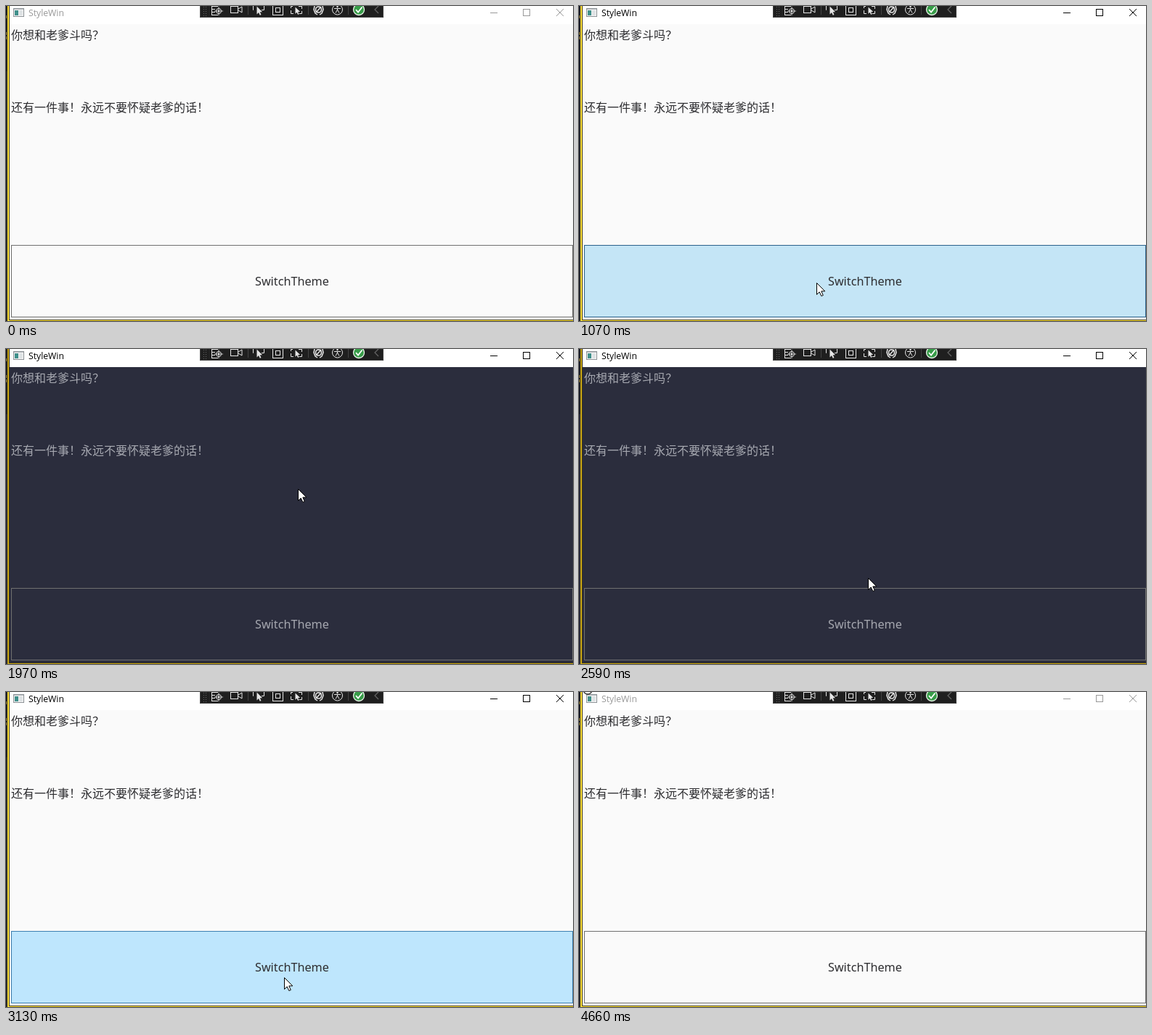
Animation, 781 px wide and 435 px high, one loop 4750 ms. Source, as an HTML page with a canvas:

```html
<!DOCTYPE html>
<html lang="zh">
<head>
<meta charset="utf-8">
<title>StyleWin</title>
<style>
  html, body { margin: 0; width: 100%; height: 100%; overflow: hidden; background: #fff; }
  canvas { display: block; width: 781px; height: 435px; }
</style>
</head>
<body>
<canvas id="stage" width="781" height="435"></canvas>
<script>
const ctx = document.getElementById('stage').getContext('2d');
const LOOP = 4750;
const CJK = '16px "Noto Sans CJK SC", "Noto Sans CJK JP", "Noto Sans CJK", sans-serif';

const THEMES = {
  light: { bg: '#fafafa', text: '#2d2d30', glow: '#ffe23c', edge: '#4b4318', strip: '#292926' },
  dark: { bg: '#2b2d3d', text: '#a6a8b0', glow: '#caa714', edge: '#35311f', strip: '#2a2a31' }
};
const BUTTON = {
  idle: { fill: null, line: '#707070' },
  hover: { fill: '#bee6fd', line: '#3c7fb1' },
  pressed: { fill: '#c4e5f6', line: '#2c628b' }
};

// Pointer samples: time, x, y
const POINTER = [
  [90, 62, 42], [180, 158, 152], [270, 245, 272], [360, 306, 356], [450, 327, 382],
  [1700, 327, 366], [1880, 356, 306], [1970, 402, 193], [2060, 409, 177],
  [2150, 412, 171], [2240, 413, 170], [2410, 412, 184], [2500, 407, 238],
  [2590, 398, 316], [2680, 387, 375], [2770, 383, 394],
  [3930, 379, 391], [4040, 308, 316], [4130, 178, 188], [4220, 70, 70], [4310, 3, 2]
];
const BUSY_FROM = 4570;

function box(x, y, w, h, color) {
  ctx.fillStyle = color;
  ctx.fillRect(x, y, w, h);
}

function frame(x, y, w, h, color) {
  ctx.strokeStyle = color;
  ctx.lineWidth = 1;
  ctx.strokeRect(x + .5, y + .5, w - 1, h - 1);
}

function path(points, color, width = 1) {
  ctx.beginPath();
  for (let i = 0; i < points.length; i += 2) ctx.lineTo(points[i], points[i + 1]);
  ctx.strokeStyle = color;
  ctx.lineWidth = width;
  ctx.stroke();
}

function circle(x, y, r, line, fill, width = 1) {
  ctx.beginPath();
  ctx.arc(x, y, r, 0, Math.PI * 2);
  if (fill) { ctx.fillStyle = fill; ctx.fill(); }
  if (line) { ctx.strokeStyle = line; ctx.lineWidth = width; ctx.stroke(); }
}

function label(str, x, y, font, color) {
  ctx.font = font;
  ctx.fillStyle = color;
  ctx.fillText(str, x, y);
}

function arrow(x, y, scale, fill, line) {
  ctx.save();
  ctx.translate(x + .5, y + .5);
  ctx.scale(scale, scale);
  ctx.beginPath();
  [[0, 0], [0, 16], [3.7, 12.4], [6.3, 18], [8.8, 17], [6.3, 11.4], [11.3, 11.4]]
    .forEach(p => ctx.lineTo(...p));
  ctx.closePath();
  ctx.fillStyle = fill;
  ctx.fill();
  if (line) { ctx.strokeStyle = line; ctx.lineWidth = 1; ctx.stroke(); }
  ctx.restore();
}

function titleBar(active) {
  const color = active ? '#000' : '#999';
  box(5, 0, 776, 25, '#fff');
  box(10, 3, 15, 12, '#f4f4f4');
  frame(10, 3, 15, 12, '#8c9296');
  box(11, 4, 13, 1, '#b9bec2');
  box(12, 6, 5, 7, '#3f8f8a');
  box(18, 6, 5, 7, '#dfe3e5');
  label('StyleWin', 31, 14, '12.2px "Open Sans", sans-serif', color);
  box(667, 9, 10, 1, color);
  frame(712, 4, 10, 10, color);
  path([758, 4, 768, 14], color);
  path([768, 4, 758, 14], color);
}

function toolbar() {
  const ink = '#e6e6e6';
  box(267, 0, 253, 16, '#1f1f1f');
  path([267.5, 0, 267.5, 15.5, 519.5, 15.5, 519.5, 0], '#444');
  for (let y = 1; y < 14; y += 3)
    for (let x = 272; x < 277; x += 3) box(x, y, 1, 1, '#666');
  [333, 416, 471].forEach(x => box(x, 0, 1, 12, '#444'));

  // element list with target
  [0, 4, 8, 12].forEach((y, i) => box(283, y, i % 3 ? 5 : 9, 1, ink));
  box(283, 0, 1, 12, ink);
  circle(293, 7, 3.5, ink);
  circle(293, 7, 1.2, null, ink);
  path([293, 1, 293, 13], ink, .8);
  path([287, 7, 299, 7], ink, .8);

  // camera
  frame(309, 0, 11, 10, ink);
  path([320, 4, 325, 1, 325, 9, 320, 6], ink);

  // select element
  path([341, 5.5, 340.5, 5.5, 340.5, 0], ink);
  path([355.5, 0, 355.5, 5.5, 352, 5.5], ink);
  arrow(345, 0, .68, ink);

  // nested boxes
  frame(367, -2, 15, 15, ink);
  frame(371, 2, 7, 7, ink);

  // dashed selection
  path([392.5, 6, 392.5, 10.5, 396, 10.5], ink);
  path([403, 0.5, 407.5, 0.5, 407.5, 4], ink);
  path([392.5, 3, 392.5, 0.5, 395, 0.5], ink);
  path([404, 10.5, 407.5, 10.5, 407.5, 7], ink);
  arrow(398, 1, .58, ink);

  // reload
  circle(430.5, 5, 4, ink, null, 1.6);
  path([425, 0, 424, 5, 426, 10, 429, 12], ink, 1.5);
  path([436, 0, 437, 5, 435, 10, 432, 12], ink, 1.5);
  path([427, 9, 434, 1], ink, 1.5);

  // accessibility
  circle(456.5, 5, 7, ink);
  circle(456.5, 1, 1.2, null, ink);
  path([452, 3.5, 461, 3.5], ink);
  path([454, 9.5, 456.5, 5, 459, 9.5], ink);
  path([456.5, 3, 456.5, 6], ink);

  // status
  circle(486, 5, 7.5, '#e8f3e8', '#379c48', 1.3);
  path([482, 5, 485, 8.5, 490.5, 1.5], '#fff', 1.8);
  path([513, 0, 508, 5, 513, 10], '#666', 1.2);
}

function leftEdge(theme) {
  box(0, 0, 2, 435, theme.strip);
  box(0, 0, 2, 90, '#1e1e1e');
  [13, 36, 42].forEach(y => box(0, y, 1, 4, '#9b8430'));
  box(2, 0, 2, 435, theme.glow);
  box(4, 0, 1, 434, theme.edge);
  box(4, 433, 777, 1, theme.edge);
  box(2, 434, 779, 1, theme.glow);
}

function buttonState(t, pos) {
  if ((t >= 980 && t < 1160) || (t >= 2950 && t < 3130)) return 'pressed';
  return pos && t < BUSY_FROM && pos[2] >= 330 ? 'hover' : 'idle';
}

function draw(t) {
  const theme = THEMES[t >= 1160 && t < 3130 ? 'dark' : 'light'];
  const pos = POINTER.filter(p => p[0] <= t).pop();
  const button = BUTTON[buttonState(t, pos)];

  box(0, 0, 781, 435, theme.bg);
  leftEdge(theme);
  titleBar(t >= 980 && t < BUSY_FROM);
  toolbar();

  label('你想和老爹斗吗？', 7, 46, CJK, theme.text);
  label('还有一件事！永远不要怀疑老爹的话！', 7, 146, CJK, theme.text);

  if (button.fill) box(7, 330, 774, 100, button.fill);
  frame(7, 330, 774, 100, button.line);
  label('SwitchTheme', 343, 386, '16.2px "Noto Sans", "Open Sans", sans-serif', theme.text);

  if (t >= BUSY_FROM) circle(12, t < 4660 ? 2 : -3, 6, '#333', '#f4f4f4', 1.3);
  else if (pos) arrow(pos[1], pos[2], 1, '#fff', '#000');
}

const start = performance.now();
function tick() {
  draw((performance.now() - start) % LOOP);
  requestAnimationFrame(tick);
}
tick();
</script>
</body>
</html>
```
